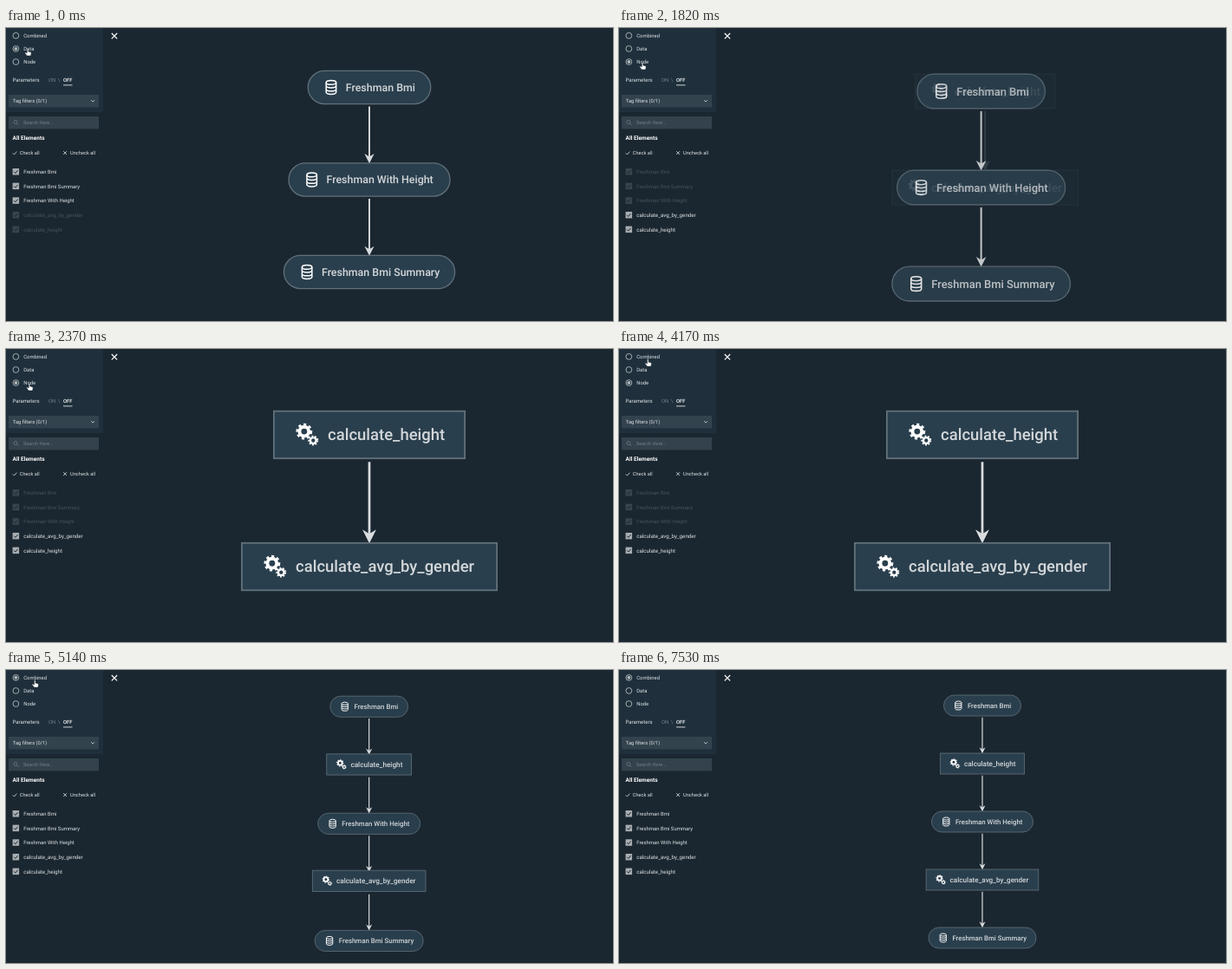
Recreate the animation shown at these times as an HTML page. Size 700 px wide and 338 px high, loop 7660 ms.

```html
<!DOCTYPE html>
<html lang="en">
<head>
<meta charset="utf-8">
<title>Pipeline views</title>
<style>
  html, body { margin: 0; width: 100%; height: 100%; overflow: hidden; background: #1b2730; }
  svg { display: block; width: 700px; height: 338px; font-family: Roboto, "Open Sans", sans-serif; text-rendering: geometricPrecision; }
</style>
</head>
<body>
<svg id="stage" viewBox="0 0 700 338"></svg>
<script>
const LOOP = 7660, GAP = 67, FADE = 700;
const stage = document.getElementById('stage');

const ticks = [0, 1120, 1530, 1680, 1820, 1950, 2100, 2230, 2370, 3610, 3760, 3890, 4020, 4170, 4310, 4440,
  4580, 4710, 4840, 4980, 5140, 5290, 5850, 5980, 6130, 6280, 6430, 6550, 6680, 6830, 6960, 7390, 7530];

const nodes = {
  bmi: { label: 'Freshman Bmi', w: 89 },
  summary: { label: 'Freshman Bmi Summary', w: 124 },
  height: { label: 'Freshman With Height', w: 117 },
  avg: { label: 'calculate_avg_by_gender', w: 129.6, task: true },
  calc: { label: 'calculate_height', w: 97, task: true }
};
const modes = [
  { name: 'Combined', zoom: 1, ids: ['bmi', 'calc', 'height', 'avg', 'summary'] },
  { name: 'Data', zoom: 1.59, ids: ['bmi', 'height', 'summary'] },
  { name: 'Node', zoom: 2.27, ids: ['calc', 'avg'] }
];
for (const m of modes) {
  m.x = Math.max(...m.ids.map(id => nodes[id].w)) / 2;
  m.view = [m.x - 69 / m.zoom, GAP * (m.ids.length - 1) / 2, 700 / m.zoom];
}
const switches = [{ at: -FADE, mode: modes[1] }, { at: 1601, mode: modes[2] }, { at: 4540, mode: modes[0] }];

// time, x, y of the pointer tip
const pointer = [[0, 25, 23.5], [1000, 25, 23.5], [1120, 27, 39.5], [3500, 27, 39.5], [3610, 31, 40], [3760, 33, 34],
  [4020, 33, 21], [4170, 33.3, 11.5], [5700, 33.3, 11.5], [5850, 36, 13], [6130, 60, 30], [6680, 440, 200], [6960, 650, 300], [7390, 650, 300]];

const mix = (a, b, p) => a + (b - a) * p;
const ease = x => x < .5 ? 4 * x ** 3 : 1 - 4 * (1 - x) ** 3;

// Smooth zoom and pan after van Wijk and Nuij; a view is [x, y, width].
function zoomBetween([x0, y0, w0], [x1, y1, w1], p) {
  const d = Math.hypot(x1 - x0, y1 - y0), diff = w1 * w1 - w0 * w0;
  const r = (w, sign) => -Math.asinh((diff + sign * 4 * d * d) / (4 * w * d));
  const r0 = r(w0, 1), z = mix(r0, r(w1, -1), p);
  const u = w0 / (2 * d) * (Math.cosh(r0) * Math.tanh(z) - Math.sinh(r0));
  return [mix(x0, x1, u), mix(y0, y1, u), w0 * Math.cosh(r0) / Math.cosh(z)];
}

const text = (x, y, s, size = 5.9, fill = '#dde1e4', more = '') =>
  `<text x="${x}" y="${y}" font-size="${size}" fill="${fill}" ${more}>${s}</text>`;
const line = (d, color = '#dde1e4', width = .8) =>
  `<path d="${d}" fill="none" stroke="${color}" stroke-width="${width}"/>`;
const box = (y, h, fill, x = 3, w = 104) => `<rect x="${x}" y="${y}" width="${w}" height="${h}" fill="${fill}"/>`;

const gear = (x, y, r) => `<g transform="translate(${x} ${y})" fill="none" stroke="#fff">
  <circle r="${r * .58}" stroke-width="${r * .42}"/>
  <circle r="${r * .86}" stroke-width="${r * .3}" pathLength="16" stroke-dasharray="1"/></g>`;
const arc = y => `M-3.6 ${y}A3.6 1.5 0 0 0 3.6 ${y}`;
const dataIcon = `<ellipse cy="-3.5" rx="3.6" ry="1.5" fill="none" stroke="#fff" stroke-width=".95"/>` +
  line(`M-3.6-3.5V3.5M3.6-3.5V3.5${arc(-1.2)}${arc(1.2)}${arc(3.5)}`, '#fff', .95);
const taskIcon = gear(-1.4, -1.7, 4.1) + gear(3.2, 2.9, 2.6);

function drawNode({ label, w, task }, x, y, opacity) {
  return `<g transform="translate(${x - w / 2} ${y})" opacity="${opacity}">
    <rect y="-12" width="${w}" height="24" rx="${task ? 0 : 12}" fill="#2a3f4d" stroke="#61717a" stroke-width=".8"/>
    <g transform="translate(16.8 0)">${task ? taskIcon : dataIcon}</g>
    ${text(27.4, 2.8, label, task ? 8.15 : 7.8, '#d3d7da', 'font-weight="500"')}</g>`;
}

function drawEdges(mode, opacity) {
  return mode.ids.slice(1).map((_, i) => {
    const tip = (i + 1) * GAP - 11.8;
    return `<g transform="translate(${mode.x} 0)" opacity="${opacity}">` +
      line(`M0 ${i * GAP + 13.8}V${tip - 4}`, '#d9dcde', 1.2) +
      `<path d="M0 ${tip}l-3.5-7 3.5 2.2 3.5-2.2z" fill="#d9dcde"/></g>`;
  }).join('');
}

function drawGraph(from, to, p) {
  const [vx, vy, vw] = p < 1 ? zoomBetween(from.view, to.view, p) : to.view;
  const k = 700 / vw;
  let out = (p < 1 ? drawEdges(from, 1 - p) : '') + drawEdges(to, p);
  for (const id in nodes) {
    const a = from.ids.indexOf(id), b = to.ids.indexOf(id);
    const n = nodes[id];
    if (a >= 0 && b >= 0) out += drawNode(n, mix(from.x, to.x, p), mix(a, b, p) * GAP, 1);
    else if (b >= 0) out += drawNode(n, to.x, b * GAP, p);
    else if (a >= 0 && p < 1) out += drawNode(n, from.x, a * GAP, 1 - p);
  }
  return `<g transform="translate(350 175) scale(${k}) translate(${-vx} ${-vy})">${out}</g>`;
}

function drawSidebar(mode) {
  let out = box(0, 97, '#1f303c', 0, 112);
  modes.forEach((m, i) => {
    const y = 8.8 + i * 15.1;
    out += `<circle cx="11.4" cy="${y}" r="3.4" fill="none" stroke="#c3c9cc" stroke-width=".8"/>` +
      (m === mode ? `<circle cx="11.4" cy="${y}" r="2" fill="#aeb5b9"/>` : '') + text(20.2, y + 2.1, m.name);
  });
  out += text(7.6, 62.4, 'Parameters', 6) + text(49, 62.4, 'ON', 5.8, '#71808a') +
    text(60, 62.4, '\\', 5.8, '#71808a') + text(66, 62.4, 'OFF', 5.8, '#fff', 'font-weight="500"') +
    line('M66 65.9h10.5', '#dde1e4', .9) +
    box(77, 14.4, '#33434e') + text(7.8, 86.3, 'Tag filters (0/1)', 5.75) + line('M98.2 83.2l1.9 1.9 1.9-1.9') +
    box(102, 14.4, '#33424c') + text(20, 111.2, 'Search Here...', 5.6, '#71808a') +
    `<circle cx="11" cy="108.5" r="2" fill="none" stroke="#71808a" stroke-width=".7"/>` + line('M12.5 110l2 2', '#71808a', .7) +
    text(7.6, 128.8, 'All Elements', 6.55, '#fff', 'font-weight="700"') +
    line('M7.8 144.4l1.6 1.6 3-3.4') + text(15.8, 146.4, 'Check all', 5.65) +
    line('M66.2 142.2l3.8 3.8M70 142.2l-3.8 3.8') + text(74, 146.4, 'Uncheck all', 5.7);
  Object.keys(nodes).forEach((id, i) => {
    out += `<g transform="translate(7.6 ${165.8 + i * 16.65})" opacity="${mode.ids.includes(id) ? 1 : .22}">
      <rect y="-3.8" width="7.5" height="7.5" fill="#a7adb1"/>` + line('M1.6 0l1.6 1.7 2.8-3.3', '#1b2730', 1) +
      text(12.6, 2.1, nodes[id].label, nodes[id].task ? 6.2 : 5.95) + '</g>';
  });
  return out + line('M121.8 6l6.4 6.4M128.2 6l-6.4 6.4', '#fff', 1.2);
}

function drawPointer(t) {
  const i = pointer.findIndex(p => p[0] > t);
  if (i < 0) return '';
  const [t0, x0, y0] = pointer[i - 1], [t1, x1, y1] = pointer[i], p = (t - t0) / (t1 - t0);
  return `<path transform="translate(${mix(x0, x1, p)} ${mix(y0, y1, p)}) scale(.9)" fill="#fff" stroke="#1b2730" stroke-width=".5"
    d="M-.8.8a.8.8 0 0 1 1.6 0V4l3 .8q.9.3.8 1.2L4 9.4H-.9L-3.4 6q-.3-1 .7-1l1.9 1z"/>`;
}

function draw(t) {
  const i = switches.findLastIndex(s => s.at <= t);
  const { at, mode } = switches[i];
  const from = switches[Math.max(0, i - 1)].mode;
  const p = ease(Math.min(1, (t - at) / FADE));
  stage.innerHTML = drawGraph(from, mode, p) + drawSidebar(mode) + drawPointer(t);
}

const start = performance.now();
let shown = -1;
function loop() {
  const now = (performance.now() - start) % LOOP;
  const t = ticks.findLast(s => s <= now);
  if (t !== shown) draw(shown = t);
  requestAnimationFrame(loop);
}
loop();
</script>
</body>
</html>
```
